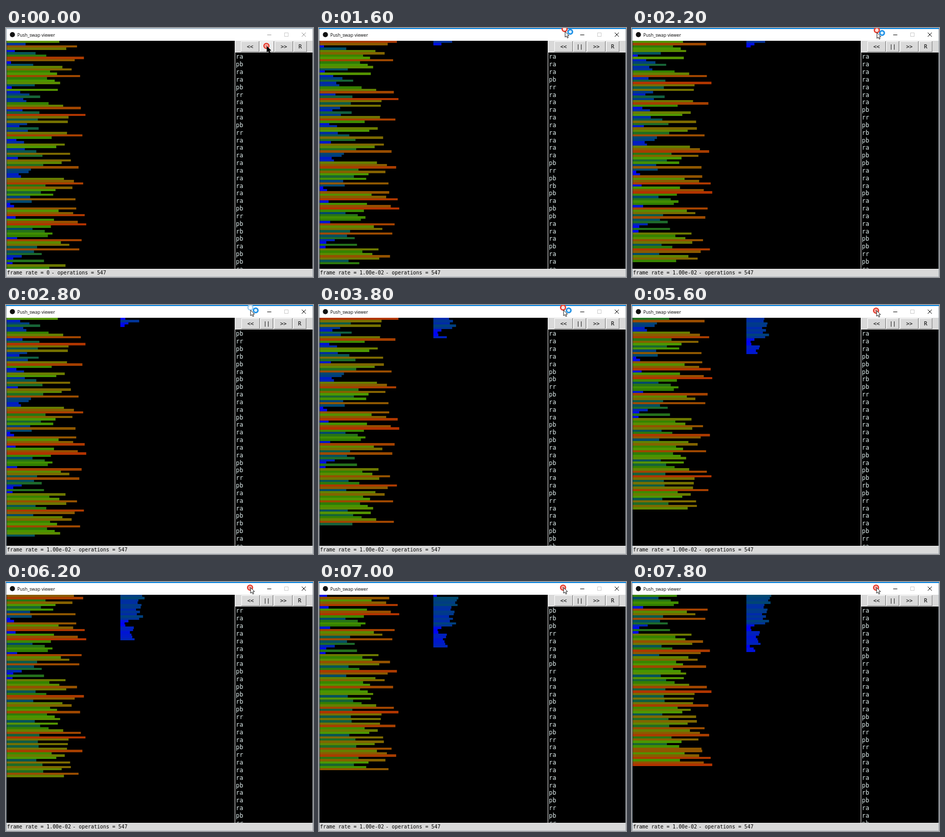
These frames come from a looping animation (600 by 487 pixels, 8000 ms). An HTML page with a canvas:

```html
<!DOCTYPE html>
<html lang="en">
<head>
<meta charset="utf-8">
<title>Push_swap viewer</title>
<style>
  html, body { margin: 0; width: 100%; height: 100%; overflow: hidden; background: #000; }
  canvas { display: block; width: 600px; height: 487px; }
</style>
</head>
<body>
<canvas id="stage" width="600" height="487"></canvas>
<script>
const ctx = document.getElementById('stage').getContext('2d');
const LOOP = 8000, STEP = 200, ROW = 4.46, TOP = 25;
const MONO = '"DejaVu Sans Mono", monospace';

// Ranks of the 100 numbers in the starting stack, top first.
const START = [
  64, 20, 87, 73, 6, 33, 47, 96, 84, 1, 30, 68, 80, 52, 61, 91, 48, 58, 65, 32,
  2, 62, 13, 25, 39, 17, 21, 50, 69, 92, 16, 38, 98, 76, 36, 75, 22, 12, 37, 23,
  74, 94, 54, 8, 18, 71, 60, 19, 34, 78, 42, 10, 79, 67, 43, 89, 27, 24, 11, 14,
  70, 83, 95, 46, 81, 59, 40, 56, 26, 85, 28, 0, 5, 86, 63, 82, 97, 7, 57, 88,
  99, 53, 29, 45, 55, 49, 9, 93, 66, 77, 35, 90, 31, 41, 15, 4, 44, 3, 72, 51
];
const NAMES = { a: 'ra', p: 'pb', r: 'rr', b: 'rb' };
const OPS = ('apaapr aaapr aaaaaaaaa prpbpapp aaap aaaaa pprp aaapbp aap aaapr aaapppbpr ' +
  'aaaaaaa pappbpr aaapr aaap aaapr aaaaaa pprprp aaapbp aap').replace(/ /g, '');

// [time, operations done]
const PROGRESS = [[0, 0], [1000, 0], [1600, 7], [2800, 21], [3800, 33], [5600, 56], [7000, 75], [7800, 85], [8000, 88]];
// [time, ring x, ring y, tip x, tip y]
const POINTER = [[0, 509, 35, 510, 36], [900, 509, 35, 510, 36], [1600, 480, 2, 481, 7],
  [2400, 478, 5, 478, 10], [3600, 477, 5, 478, 10], [4800, 477, 5, 478, 10], [5000, 477, 11, 478, 11], [8000, 477, 11, 478, 11]];

function sample(table, t) {
  const i = table.findIndex(row => row[0] > t);
  const [from, to] = [table[i - 1], table[i]];
  const k = (t - from[0]) / (to[0] - from[0]);
  return from.slice(1).map((v, n) => v + (to[n + 1] - v) * k);
}

function stacksAfter(count) {
  const a = START.slice(), b = [];
  const rotate = s => s.length && s.push(s.shift());
  for (const op of OPS.slice(0, count)) {
    if (op === 'p') b.unshift(a.shift());
    if (op === 'a' || op === 'r') rotate(a);
    if (op === 'b' || op === 'r') rotate(b);
  }
  return [a, b];
}

function barColor(x) {
  const r = 255 * Math.max(0, x - 0.3);
  const g = 255 * x - 510 * Math.max(0, x - 0.6);
  const b = Math.max(0, 255 - 510 * x);
  return `rgb(${r | 0},${g | 0},${b | 0})`;
}

function box(x, y, w, h, color) {
  ctx.fillStyle = color;
  ctx.fillRect(x, y, w, h);
}

function text(str, x, y, font, color, align = 'left') {
  ctx.font = font;
  ctx.fillStyle = color;
  ctx.textAlign = align;
  ctx.fillText(str, x, y);
}

function line(points, color, width = 1) {
  ctx.beginPath();
  points.forEach(([x, y], i) => i % 2 ? ctx.lineTo(x, y) : ctx.moveTo(x, y));
  ctx.strokeStyle = color;
  ctx.lineWidth = width;
  ctx.stroke();
}

function ring(x, y, r, width, color, fill) {
  ctx.beginPath();
  ctx.arc(x, y, r, 0, Math.PI * 2);
  if (fill) { ctx.fillStyle = fill; ctx.fill(); }
  ctx.strokeStyle = color;
  ctx.lineWidth = width;
  ctx.stroke();
}

function drawStack(stack, left) {
  stack.forEach((rank, i) => {
    const y0 = Math.round(TOP + i * ROW), y1 = Math.round(TOP + (i + 1) * ROW);
    box(left, y0, 6.8 + 1.5 * rank, y1 - y0, barColor(rank / 99));
  });
}

function button(x, w, label, face = '#d9d9d9') {
  box(x, 26, w, 21, '#7f7f7f');
  box(x, 26, w - 1, 20, '#fff');
  box(x + 1, 27, w - 2, 19, face);
  text(label, x + w / 2, 40, '10.5px ' + MONO, '#000', 'center');
}

function drawFrame(active) {
  box(0, 0, 600, 487, '#d9d9d9');
  box(0, 0, 600, 25, '#fff');
  box(0, 0, 600, 2, active ? '#0a84de' : '#a9bccb');
  ctx.beginPath();
  ctx.arc(12.5, 13, 5, 0, Math.PI * 2);
  ctx.fillStyle = '#111';
  ctx.fill();
  text('Push_swap viewer', 22, 16.5, '8.7px "Open Sans", "Noto Sans", sans-serif', '#000');
  const ink = active ? '#000' : '#999';
  line([[510.5, 13.5], [518.5, 13.5]], ink);
  ctx.strokeStyle = '#ccc';
  ctx.strokeRect(544.5, 9.5, 7, 7);
  line([[578, 9], [586, 17], [586, 9], [578, 17]], ink);
}

function drawPointer(t) {
  const [rx, ry, x, y] = sample(POINTER, t);
  const busy = t >= 1400 && t < 5000;
  const pale = t >= 2400 && t < 3200;
  ring(rx, ry, 4.8, 2.6, pale ? '#9fd0f2' : '#e63a2c', pale ? '#fff' : '#fbe3e0');
  if (!busy) ring(rx, ry, 1.6, 1.4, '#e8584c');
  if (busy) ring(x + 10, y + 0.5, 4.4, 2.8, '#1c8fe6', '#d8f0ff');
  ctx.beginPath();
  [[0, 0], [0, 11], [2.6, 8.8], [4.4, 12.6], [6.2, 11.8], [4.5, 8], [7.8, 7.8]]
    .forEach(([dx, dy]) => ctx.lineTo(x + dx, y + dy));
  ctx.closePath();
  ctx.fillStyle = t < 1000 ? '#000' : '#fff';
  ctx.fill();
  ctx.strokeStyle = '#000';
  ctx.lineWidth = 0.9;
  ctx.stroke();
}

function draw(t) {
  const done = Math.round(sample(PROGRESS, t)[0]);
  const playing = t >= 1000;
  const [a, b] = stacksAfter(done);

  drawFrame(t >= 200);
  box(1, TOP, 446, 446, '#000');
  drawStack(a, 1.5);
  drawStack(b, 223.5);
  box(447, TOP, 1, 446, '#f4f4f4');

  if (playing) {
    button(460, 36, '<<');
    button(497, 25, '||');
    button(524, 36, '>>');
    button(561, 26, 'R');
  } else {
    button(459, 36, '<<');
    button(496, 28, '', '#ececec');
    button(525, 36, '>>');
    button(562, 26, 'R');
  }

  box(448, 48, 151, 423, '#000');
  ctx.save();
  ctx.beginPath();
  ctx.rect(448, 48, 151, 422.5);
  ctx.clip();
  const first = Math.max(0, done - 1);
  for (let i = 0; i < 29 && first + i < OPS.length; i++) {
    text(NAMES[OPS[first + i]], 449.3, 60.3 + i * 14.84, '11.8px ' + MONO, '#e6f4f4');
  }
  ctx.restore();

  box(0, 471, 600, 1, '#eee');
  const rate = 'frame rate = ' + (playing ? '1.00e-02' : '0');
  const font = '9.9px ' + MONO;
  text(rate, 2, 482, font, '#000');
  text('- operations = 547', 2 + ctx.measureText(rate).width + 3.5, 482, font, '#000');
  box(0, 2, 1, 485, '#8a99a5');
  box(599, 2, 1, 485, '#a8b0b6');
  box(0, 486, 600, 1, '#b4bac0');
  drawPointer(t);
}

const begin = performance.now();
let shown = -1;
function tick() {
  const t = Math.floor((performance.now() - begin) % LOOP / STEP) * STEP;
  if (t !== shown) draw(shown = t);
  requestAnimationFrame(tick);
}
tick();
</script>
</body>
</html>
```
